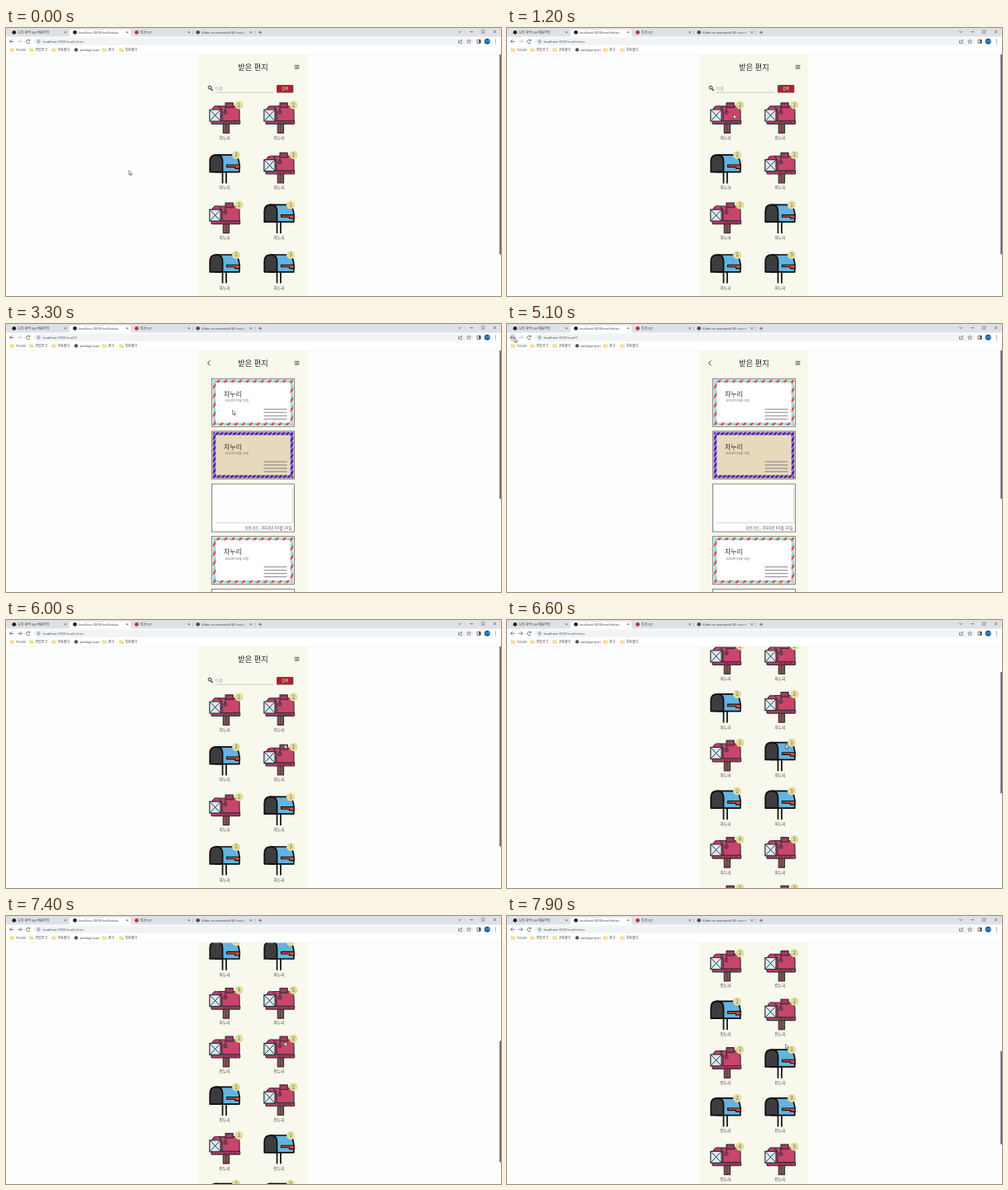
An HTML page for the animation above (8000 ms loop, 600x325 px).

```html
<!DOCTYPE html>
<html lang="ko">
<head>
<meta charset="utf-8">
<title>받은 편지</title>
<style>
  html, body { margin: 0; width: 100%; height: 100%; overflow: hidden; background: #fff; }
  svg { display: block; width: 100vw; height: 100vh; }
  text { font-family: "Noto Sans CJK KR", "Noto Sans CJK", "Noto Sans", sans-serif; }
  .ui { font-family: "Open Sans", "Noto Sans CJK KR", sans-serif; font-size: 4px; fill: #3c4043; }
  .line { fill: none; stroke: #44474a; stroke-width: .7; }
  .mid { text-anchor: middle; }
</style>
</head>
<body>
<svg id="stage" viewBox="0 0 600 325" preserveAspectRatio="none"></svg>
<script>
const LOOP = 8000, TOP = 32, VIEW = 293;
const NAMES = ["차누리", "민누리"];
// kind and count for the left and right box of each row
const BOXES = ["r2 r2", "b2 r2", "r2 b1", "b2 b3", "r4 r5"].map(s => s.split(" "));
const BADGE_X = { r: 36.4, b: 33 };
const svg = document.getElementById("stage");

const text = (x, y, s, size, fill = "#333", extra = "") =>
  `<text x="${x}" y="${y}" font-size="${size}" fill="${fill}" ${extra}>${s}</text>`;
const label = (x, y, s, extra = "") => `<text class="ui" x="${x}" y="${y}" ${extra}>${s}</text>`;
const rect = (x, y, w, h, fill, extra = "") =>
  `<rect x="${x}" y="${y}" width="${w}" height="${h}" fill="${fill}" ${extra}/>`;
const dot = (x, y, r, fill, extra = "") => `<circle cx="${x}" cy="${y}" r="${r}" fill="${fill}" ${extra}/>`;
const line = (d, extra = "") => `<path class="line" d="${d}" ${extra}/>`;
const cross = (x, y, r) => line(`M${x - r} ${y - r}l${2 * r} ${2 * r}m0 ${-2 * r}l${-2 * r} ${2 * r}`);

const defs = `<defs>
  <pattern id="air" width="7" height="7" patternUnits="userSpaceOnUse" patternTransform="rotate(38)">
    ${rect(0, 0, 7, 7, "#8ed8e8")}${rect(0, 0, 2.7, 7, "#dc4a35")}${rect(2.7, 0, 1, 7, "#f4f7f7")}
  </pattern>
  <pattern id="violet" width="4.2" height="4.2" patternUnits="userSpaceOnUse" patternTransform="rotate(38)">
    ${rect(0, 0, 4.2, 4.2, "#4620b4")}${rect(0, 0, 1.1, 4.2, "#d3c1d6")}
  </pattern>
  <linearGradient id="fade"><stop offset="0" stop-color="#dee1e6" stop-opacity="0"/><stop offset="1" stop-color="#dee1e6"/></linearGradient>
  <g id="r" stroke="#33313d" stroke-width="1.2" stroke-linejoin="round">
    ${rect(17.3, 26, 7.2, 11.6, "#84524f")}
    <path d="M20.9 27v10" stroke-width=".6"/>
    <path d="M3.5 23V12Q3.5 5 10 5H32Q37 5 37 12V23Z" fill="#c8456b"/>
    <path d="M10 5Q16 6 16 13V23" fill="none"/>
    <path d="M6 5.2Q13 3.6 14.5 11" fill="none" stroke="#a83a5b"/>
    ${rect(3, 22.8, 34.6, 3.8, "#b93e61", 'rx=".8"')}
    <path d="M17 24.7h17" stroke-width=".7" stroke-dasharray="5 1"/>
    ${rect(.8, 9.2, 13.2, 14, "#dcebf0")}
    <path d="M1 9.4L14 23M14 9.4L1 23" fill="none" stroke-width="1"/>
    <path d="M20 12V1h9.2v5.6H20" fill="#ad3857"/>
    ${dot(20, 12.4, 2, "#a83a5b", 'stroke-width="1"')}
  </g>
  <g id="b" stroke="#0c0c0c" stroke-width="1.7" stroke-linejoin="round">
    <path d="M16.5 24V38M20.9 24V38" fill="none"/>
    <path d="M8 3.4H29Q35.6 3.6 36.8 14V24.2H8Z" fill="#62b4e1"/>
    <path d="M1.2 24.2V11Q1.2 3.4 8.8 3.4T16.5 11V24.2Z" fill="#3d3d3f"/>
    <path d="M21.5 15.6H37.2V20H31.5V18.2H21.5Z" fill="#ea4632" stroke-width="1.1"/>
  </g>
  <g id="folder"><path d="M-2.4-1.9h1.9l.7.8h2.2v3.3h-4.8z" fill="#fbdf8c" stroke="#ecc967" stroke-width=".35"/></g>
</defs>`;

function mailbox(x, [kind, count], name) {
  const cx = x + BADGE_X[kind];
  return `<use href="#${kind}" x="${x}"/>` +
    dot(cx, 3.6, 5, "#e2dc9f") +
    text(cx, 5.7, count, 5.7, "#5f5b40", 'class="mid"') +
    text(x + 19, 45, name, 4.8, "#444", 'class="mid" font-weight="300"');
}

function row(i) {
  const [a, b] = BOXES[i % 5], name = NAMES[i < 5 ? 0 : 1];
  return `<g class="row">${mailbox(246, a, name)}${mailbox(312, b, name)}</g>`;
}

const header = text(299.5, 51, "받은 편지", 9.2, "#222", 'class="mid"') +
  line("M349.8 45.4h5.6m-5.6 1.9h5.6m-5.6 1.9h5.6", 'style="stroke:#333;stroke-width:.8"');

const inbox = `<g id="inbox">${header}
  <g fill="none" stroke="#222"><circle cx="247" cy="72.2" r="1.9" stroke-width=".9"/><path d="M248.4 73.7l2.2 2.3" stroke-width="1.1"/></g>
  ${text(253.6, 75, "이름", 5, "#aaa", 'font-weight="300"')}
  ${line("M253.5 78.2H324", 'style="stroke:#999;stroke-width:.5"')}
  ${rect(328, 69, 20.3, 9.6, "#a12831", 'rx="1.2"')}
  ${text(338.1, 75.4, "검색", 4.2, "#fff", 'class="mid"')}
  ${Array.from({ length: 12 }, (_, i) => row(i)).join("")}</g>`;

function envelope(y, paper, stripes) {
  return `<g transform="translate(249.5 ${y})">` +
    rect(0, 0, 100, 58, paper, 'stroke="#66665f" stroke-width=".8"') +
    rect(3, 3, 94, 52, paper, `stroke="url(#${stripes})" stroke-width="3.4"`) +
    text(14.6, 21.6, NAMES[0], 7.8, "#333") +
    text(16, 28.2, "2022년 03월 15일", 3.7, "#666") +
    line("M63 37h28m-28 4h28m-28 4h28m-28 4h28", 'style="stroke:#555566"') + "</g>";
}

const photoCard = `<g transform="translate(249.5 194)">
  ${rect(0, 0, 100, 58, "#fff", 'stroke="#66665f" stroke-width=".8"')}
  ${rect(4.5, 4, 93.5, 43, "#fdfdfd")}
  ${line("M98.2 4V47H4.5", 'style="stroke:#c9c9cc;stroke-width:.8"')}
  ${text(97.2, 55, "포토카드, 2022년 03월 15일", 4.8, "#555", 'text-anchor="end" font-weight="300"')}</g>`;

const letters = `<g id="letters">${header}
  ${line("M247.4 44.4l-3 2.9 3 2.9", 'style="stroke:#333;stroke-width:1"')}
  ${envelope(66.3, "#fff", "air")}${envelope(130, "#e7d9bc", "violet")}${photoCard}
  ${envelope(257.6, "#fff", "air")}${rect(249.5, 321.4, 100, 58, "#fff", 'stroke="#66665f" stroke-width=".8"')}</g>`;

const folders = [[7.5, "TULEB"], [31, "취업공고"], [58, "공용폴더"], [119.5, "참고"], [140, "특화폴더"]]
  .map(([x, s]) => `<use href="#folder" x="${x}" y="26.4"/>` + label(x + 4.4, 28, s)).join("");

const chrome = `${rect(0, 0, 600, 32.3, "#fff")}${rect(0, 0, 600, 10.5, "#dee1e6")}
  <path d="M74.5 10.5Q77 10.5 77 8V4Q77 1.8 79 1.8H149Q151 1.8 151 4V8Q151 10.5 153.5 10.5Z" fill="#fff"/>
  ${dot(9.8, 5.3, 2.4, "#222")}${label(14.2, 6.8, "도담 새싹 SW 배움마당")}${cross(72.2, 5.3, 1.1)}
  ${dot(83.5, 5.3, 2.4, "#1e1e1e")}${label(88, 6.8, "localhost:3000/mail/inbox")}${cross(147, 5.3, 1.1)}
  ${dot(158.4, 5.3, 2.4, "#b43238")}${label(162.8, 6.8, "특화 PJT")}${cross(221.7, 5.3, 1.1)}
  ${line("M226.5 3v5M301.5 3v5", 'style="stroke:#9a9da1;stroke-width:.4"')}
  ${dot(232.7, 5.3, 2.3, "#4c4c55")}${label(237, 6.8, "Video to animated GIF converter")}
  ${rect(284, 2, 8, 8, "url(#fade)")}${rect(292, 2, 9, 7, "#dee1e6")}${cross(296.8, 5.3, 1.1)}
  ${line("M306.2 5.3h4m-2-2v4M548.4 3.8l1.7 1.7 1.7-1.7M562.4 4.6h3.6")}
  ${line("M576.6 2.8h3.4v3.4h-3.4z", 'style="stroke-width:.5"')}${cross(592.5, 4.5, 1.5)}
  ${rect(34, 11.8, 533, 9.2, "#f1f3f4", 'rx="4.6"')}
  <circle id="hover" cx="7" cy="16.3" r="4.4" fill="#dfe1e4"/>
  ${line("M9.5 16.3h-5m2.2-2.2l-2.2 2.2 2.2 2.2")}
  ${line("M14 16.3h5m-2.2-2.2l2.2 2.2-2.2 2.2", 'id="forward"')}
  ${line("M28.6 15A2.2 2.2 0 1 0 29 17.1M29 13.6v1.7h-1.8", 'id="reload"')}
  <g id="stop">${cross(26.9, 16.3, 1.6)}</g>
  ${line("M39.5 15.8v2m0-3v.5", 'style="stroke-width:.5"')}${dot(39.5, 16.3, 1.8, "none", 'stroke="#55585c" stroke-width=".5"')}
  <text class="ui" x="44.4" y="17.9" style="font-size:4.15px">localhost<tspan id="path" fill="#53575c"></tspan></text>
  ${line("M549.2 15.3h-.7v3h4.3v-1M549.8 17q.3-2 2.7-2m-1-1.2l1.2 1.2-1.2 1.2", 'style="stroke-width:.6"')}
  ${line("M561 13.8l.7 1.6 1.7.2-1.3 1.2.4 1.7-1.5-.9-1.5.9.4-1.7-1.3-1.2 1.7-.2z", 'style="stroke-width:.5"')}
  ${line("M571 14.3h4.2v4H571z")}${rect(573.2, 14.3, 2, 4, "#44474a")}
  ${dot(583.2, 16.3, 3.5, "#17629f")}${text(583.2, 17.3, "누리", 2.7, "#fff", 'class="mid"')}
  ${[14.4, 16.3, 18.2].map(y => dot(593.3, y, .5, "#44474a")).join("")}
  ${folders}${dot(85, 26.4, 2.2, "#4e5358")}${label(89.4, 28, "package.json")}
  ${line("M0 32.1H600", 'style="stroke:#e4e5e7;stroke-width:.5"')}`;

svg.innerHTML = `${defs}${rect(0, 0, 600, 325, "#fefefe")}
  ${rect(233.3, TOP, 132.2, VIEW, "#f8f8ec")}
  ${inbox}${letters}${chrome}
  <rect id="thumb" x="598.2" width="1.8" fill="#686b6f"/>
  <path id="cursor" d="M0 0V5.6L1.3 4.5 2.2 6.5 3.1 6.1 2.2 4.2H4Z" fill="#fff" stroke="#222" stroke-width=".5"/>`;

const part = Object.fromEntries([...svg.querySelectorAll("[id]")].map(e => [e.id, e]));
const rows = [...svg.querySelectorAll(".row")];
const show = (e, on) => e.setAttribute("display", on ? "inline" : "none");
const smooth = p => p * p * (3 - 2 * p);

// keys are [time, ...values]
function track(keys, t, ease = p => p) {
  if (t <= keys[0][0]) return keys[0].slice(1);
  const i = keys.findIndex(k => k[0] > t);
  if (i < 0) return keys[keys.length - 1].slice(1);
  const a = keys[i - 1], b = keys[i], p = ease((t - a[0]) / (b[0] - a[0]));
  return a.slice(1).map((v, j) => v + (b[j + 1] - v) * p);
}

const CURSOR = [[0, 149, 172.5], [1200, 274.6, 104.5], [4150, 274.6, 104.5], [5050, 9, 16.5],
  [5250, 9, 16.5], [6000, 337.6, 150.5], [7000, 337.6, 150.5], [7900, 337.6, 155]];
const SCROLL = [[6300, 0], [6600, 62], [7000, 155], [7900, 342]];

function draw(t) {
  const inLetters = t >= 2800 && t < 5300;
  const atLetter = t >= 2400 && t < 5200;
  const loading = t >= 2400 && t < 3000;
  const count = t < 6600 ? 5 : t < 7700 ? 9 : 12;
  const height = inLetters ? 477 : { 5: 354, 9: 584, 12: 760 }[count];
  const gap = count === 5 ? 60.6 : 58.7;
  const [scroll] = track(SCROLL, t);
  const [x, y] = track(CURSOR, t, smooth);

  show(part.inbox, !inLetters);
  show(part.letters, inLetters);
  part.inbox.setAttribute("transform", `translate(0 ${-scroll})`);
  rows.forEach((r, i) => {
    show(r, i < count);
    r.setAttribute("transform", `translate(0 ${89.8 + i * gap})`);
  });

  part.path.textContent = ":3000/mail/" + (atLetter ? "0" : "inbox");
  show(part.stop, loading);
  show(part.reload, !loading);
  show(part.hover, t >= 5000 && t < 5400);
  part.forward.style.stroke = t < 5200 ? "#b4b7ba" : "#44474a";

  part.thumb.setAttribute("y", TOP + scroll / height * VIEW);
  part.thumb.setAttribute("height", VIEW * VIEW / height);
  part.cursor.setAttribute("transform", `translate(${x} ${y})`);
}

const start = performance.now();
function tick() {
  const t = (performance.now() - start) % LOOP;
  draw(Math.floor(t / 100) * 100);
  requestAnimationFrame(tick);
}
tick();
</script>
</body>
</html>
```
